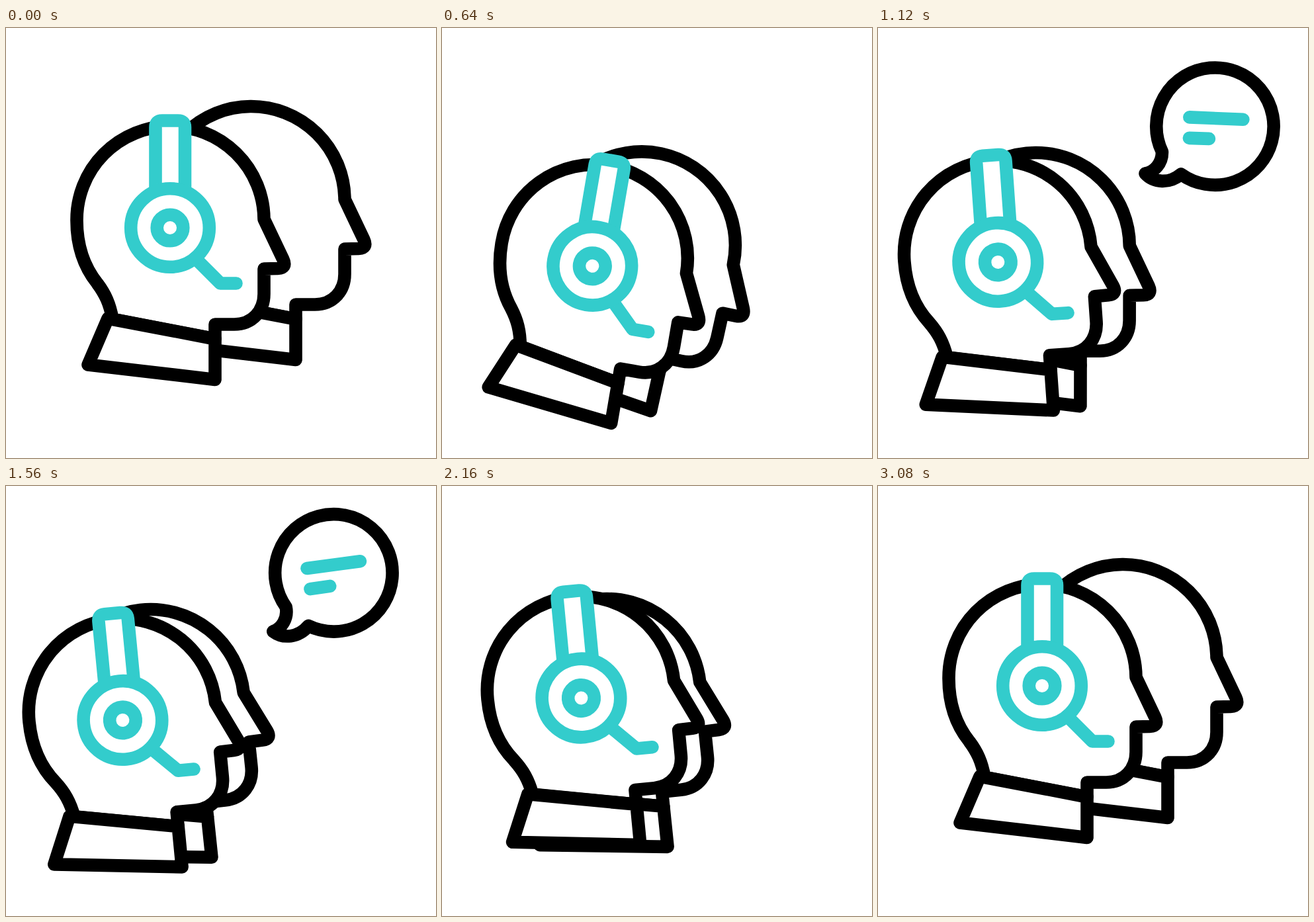
Recreate the animation shown at these times as an HTML page. Size 650x650 px, loop 3.6 s.

```html
<!DOCTYPE html>
<html lang="en">
<head>
<meta charset="utf-8">
<title>Support agents</title>
<style>
  html, body { margin: 0; width: 100%; height: 100%; overflow: hidden; background: #fff; }
  svg { display: block; width: 100vw; height: 100vh; }
  .line { fill: #fff; stroke: #000; stroke-width: 19.6; stroke-linecap: round; stroke-linejoin: round; }
  .teal { stroke: #3cc; }
</style>
</head>
<body>
<svg viewBox="0 0 650 650">
  <defs>
    <g id="head" class="line">
      <path d="M161 440C157 417 150 402 138 386C118 361 107 330 107 291A141.500 141.500 0 0 1 390 289L419 350Q425 363 411 363.500L390 364V402C390 428 372 448 345 448H316V470Z"/>
      <path d="M154 439L124 509L316 531.500V470Z"/>
    </g>
  </defs>
  <g id="back"><use href="#head" x="122" y="-30"/></g>
  <g id="front">
    <use href="#head"/>
    <g class="line teal">
      <path d="M226 245V150Q226 140 236 140H260Q270.500 140 270.500 150V245" stroke-linecap="butt"/>
      <path d="M288 350L324 386H348" fill="none"/>
      <circle cx="248" cy="302" r="59.300"/>
      <circle cx="248" cy="302" r="19.800"/>
    </g>
  </g>
  <g id="bubble" class="line">
    <path d="M458 221A88.700 88.700 0 1 0 429.500 187C430 205 417 218 404 220C417 234 440 236 458 221Z"/>
    <path class="teal" d="M471 135L552 138.500M470.500 166.500L500.500 167.500"/>
  </g>
</svg>
<script>
const LOOP = 3600, STEP = 40;
const byId = id => document.getElementById(id);

// Eased rise from 0 to 1 between two times.
function ramp(t, start, end) {
  const u = Math.min(1, Math.max(0, (t - start) / (end - start)));
  return (1 - Math.cos(Math.PI * u)) / 2;
}

// Moves a drawing's pivot by (dx, dy), then turns and scales it there.
function pose(id, [px, py], dx, dy, turn, size = 1) {
  byId(id).setAttribute("transform",
    `translate(${px + dx} ${py + dy}) rotate(${turn}) scale(${size}) translate(${-px} ${-py})`);
}

// Both heads slide down left while nodding, lean back, then return.
function drawFront(t) {
  const away = ramp(t, 40, 620) - ramp(t, 1720, 2468);
  const nod = 9.7 * ramp(t, 40, 620);
  const lean = -15.2 * ramp(t, 640, 1240) + 5.5 * ramp(t, 2100, 2900);
  pose("front", [233, 495], -53 * away, 52.5 * away, nod + lean);
}

function drawBack(t) {
  const away = ramp(t, 100, 845) - ramp(t, 1912, 2693);
  const nod = 12.5 * ramp(t, 60, 640);
  const lean = -18.5 * ramp(t, 680, 1400) + 6 * ramp(t, 2080, 3040);
  pose("back", [342, 449], -132 * away, 70 * away, nod + lean);
}

// The bubble pops out of its tail and swings around it.
function drawBubble(t) {
  const size = ramp(t, 640, 800) - ramp(t, 1760, 1920);
  const swing = -4.6 - 10.7 * Math.cos(2 * Math.PI * (t - 954) / 520);
  byId("bubble").style.display = size > 0 ? "" : "none";
  pose("bubble", [403, 221], 0, 0, swing, size);
}

function draw() {
  const t = Math.floor(performance.now() % LOOP / STEP) * STEP;
  drawFront(t);
  drawBack(t);
  drawBubble(t);
  requestAnimationFrame(draw);
}
draw();
</script>
</body>
</html>
```
